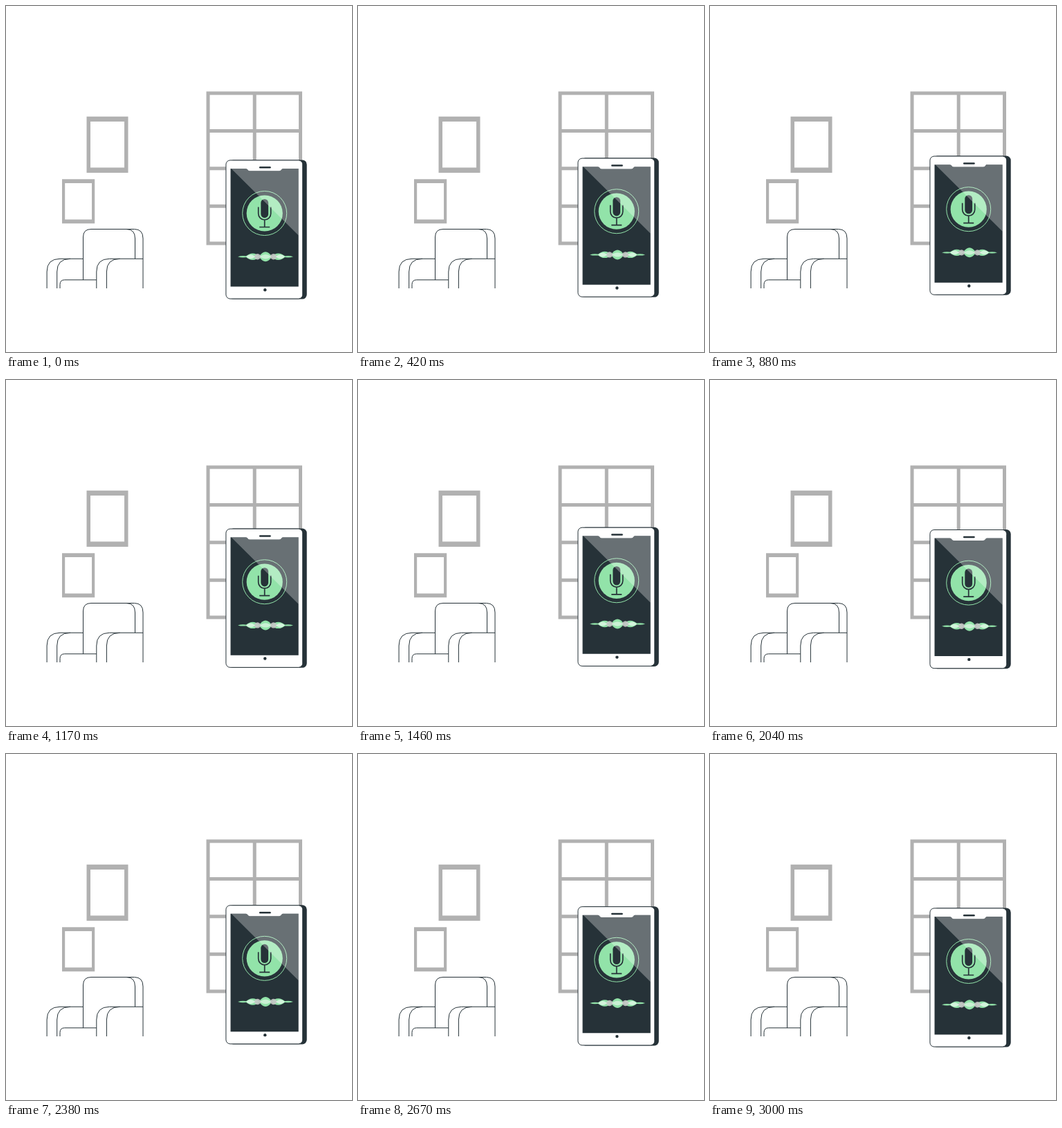
Animation of 500 by 500 pixels, one loop 3.04 s. Source, as an HTML page:

```html
<!DOCTYPE html>
<html lang="en">
<head>
<meta charset="utf-8">
<title>Voice assistant</title>
<style>
  html, body { margin: 0; width: 100%; height: 100%; overflow: hidden; background: #fff; }
  svg { display: block; width: 100%; height: 100%; }
</style>
</head>
<body>
<svg viewBox="0 0 500 500">
  <g fill="none" stroke="#b1b1b1">
    <g stroke-width="5">
      <rect x="292" y="126" width="133.5" height="217"/>
      <path d="M359.2 126V343M292 180.5H425M292 234.7H425M292 289.3H425"/>
    </g>
    <path fill="#b1b1b1" fill-rule="evenodd" stroke="none"
      d="M116.5 159.7H176.5V241H116.5ZM122 167V233.5H171V167Z
         M81 250.3H128.2V314.2H81ZM85.2 256V308.5H124V256Z"/>
  </g>

  <g fill="none" stroke="#263238">
    <path d="M111.5 396V334Q111.5 322.5 123 322.5H174Q186.5 322.5 186.5 336V365"/>
    <path d="M174 322.5H185.5Q198 322.5 198 336V408"/>
    <path d="M59.1 408V384Q59.1 365.3 78 365.3H111.5M73.7 408V384Q73.7 365.3 93 365.3"/>
    <path d="M130.8 408V384Q130.8 365.3 149.5 365.3H198M145.4 408V384Q145.4 365.3 164.5 365.3"/>
    <path d="M78 408V402.5Q78 395.8 84.5 395.8H130.8"/>
  </g>

  <g id="phone">
    <rect x="322" y="222.4" width="112.7" height="201.2" rx="6.5" fill="#263238"/>
    <rect x="317.9" y="222.9" width="110.8" height="200.2" rx="6" fill="#fff" stroke="#263238"/>
    <path d="M324.5 235H346.5Q348.5 235 349.2 236.5T352 238.3H395Q397.200 238.300 398 236.500T400.500 235H422.700V405.500H324.500Z" fill="#263238"/>
    <path d="M367.200 233.300H381.500" stroke="#263238" stroke-width="2.500" stroke-linecap="round"/>
    <circle cx="374.300" cy="410.300" r="2.200" fill="#263238"/>

    <circle cx="373.700" cy="299.500" r="26.100" fill="#92e3a9"/>
    <circle cx="373.700" cy="299.500" r="32" fill="none" stroke="#92e3a9"/>
    <rect x="368.300" y="279" width="10.800" height="27.200" rx="5.400" fill="#263238"/>
    <path d="M364.700 290.500V300A9 9 0 0 0 382.700 300V290.500M373.700 309V319.500M366.200 319.500H381.200"
      fill="none" stroke="#263238" stroke-width="1.700"/>

    <g id="wave"></g>
    <path d="M325.500 235H346.500Q348.500 235 349.200 236.500T352 238.300H395Q397.200 238.300 398 236.500T400.500 235H422.700V331.500Z" fill="#fff" opacity=".3"/>
  </g>
</svg>
<script>
  const phone = document.getElementById('phone');
  const wave = document.getElementById('wave');
  const CENTER = 375, WAVE_Y = 362.2;
  const LOOP = 3041, FLOAT = 3000, RISE = 10, FPS = 24;

  // Spindle shape with pointed ends
  function spindle(from, to, height, fill, opacity = 1) {
    const third = (to - from) / 3;
    const side = dir => {
      const y = WAVE_Y + dir * height * 4 / 3;
      return [from + third, to - third].map(x => `${x} ${y}`);
    };
    const [a, b] = side(-1), [c, d] = side(1);
    return `<path d="M${from} ${WAVE_Y}C${a} ${b} ${to} ${WAVE_Y}C${d} ${c} ${from} ${WAVE_Y}Z" fill="${fill}" opacity="${opacity}"/>`;
  }

  const mirrored = (near, far, ...look) =>
    spindle(CENTER - far, CENTER - near, ...look) + spindle(CENTER + near, CENTER + far, ...look);

  wave.innerHTML =
    mirrored(25, 40, 1.2, '#92e3a9') +
    mirrored(8, 29, 4.7, '#92e3a9') +
    spindle(CENTER - 9.5, CENTER + 9.5, 7, '#92e3a9') +
    mirrored(6, 17, 4.2, '#c7c7c7', .9) +
    mirrored(15, 28, 3, '#fff', .6) +
    spindle(CENTER - 8, CENTER + 8, 3.2, '#fff', .5);

  function draw(time) {
    const step = Math.floor((time % LOOP + 5) * FPS / 1000);
    const phase = Math.min(step / FPS * 1000 / FLOAT, 1);
    const lift = RISE * (1 - Math.abs(2 * phase - 1));
    phone.setAttribute('transform', `translate(0 ${-lift})`);
  }

  const start = performance.now();
  function tick() {
    draw(performance.now() - start);
    requestAnimationFrame(tick);
  }
  tick();
</script>
</body>
</html>
```
